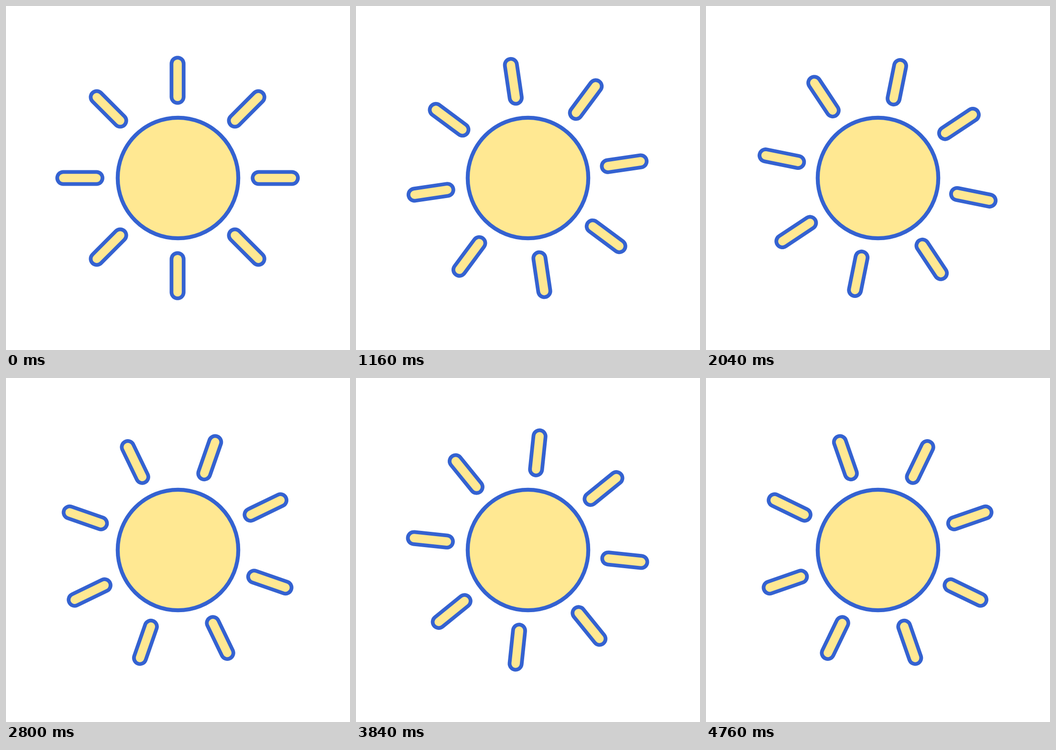
An HTML page for the animation above (4800 ms loop, 720 by 720 pixels).

```html
<!DOCTYPE html>
<html lang="en">
<head>
<meta charset="utf-8">
<title>Sun</title>
<style>
  html, body { margin: 0; width: 100%; height: 100%; overflow: hidden; background: #fff; }
  svg { display: block; width: 100%; height: 100%; }
  .line { stroke: #3462d1; }
  .fill { stroke: #ffe892; }
  #rays { stroke-linecap: round; }
  #rays .line { stroke-width: 33.2; }
  #rays .fill { stroke-width: 17.6; }
  .disc { fill: #ffe892; stroke-width: 8.2; }
</style>
</head>
<body>
<svg viewBox="0 0 720 720">
  <g id="rays"></g>
  <circle class="disc line" cx="360" cy="360" r="126.2"/>
</svg>
<script>
  const LOOP = 4800, TICK = 40, STEP_DEG = 2.4;
  const rays = document.getElementById('rays');

  for (let a = 0; a < 360; a += 45) {
    for (const cls of ['line', 'fill']) {
      const ray = document.createElementNS(rays.namespaceURI, 'path');
      ray.setAttribute('class', cls);
      ray.setAttribute('d', 'M0-169.8V-239.2');
      ray.setAttribute('transform', `rotate(${a})`);
      rays.append(ray);
    }
  }

  // The spin advances at 29.97 steps a second, shown 25 times a second.
  function draw(ms) {
    const tick = Math.floor((ms % LOOP) / TICK);
    const step = Math.floor(tick * TICK * 0.02997);
    rays.setAttribute('transform', `translate(359.1 360) rotate(${step * STEP_DEG})`);
  }

  const start = performance.now();
  function loop() {
    draw(performance.now() - start);
    requestAnimationFrame(loop);
  }
  loop();
</script>
</body>
</html>
```
